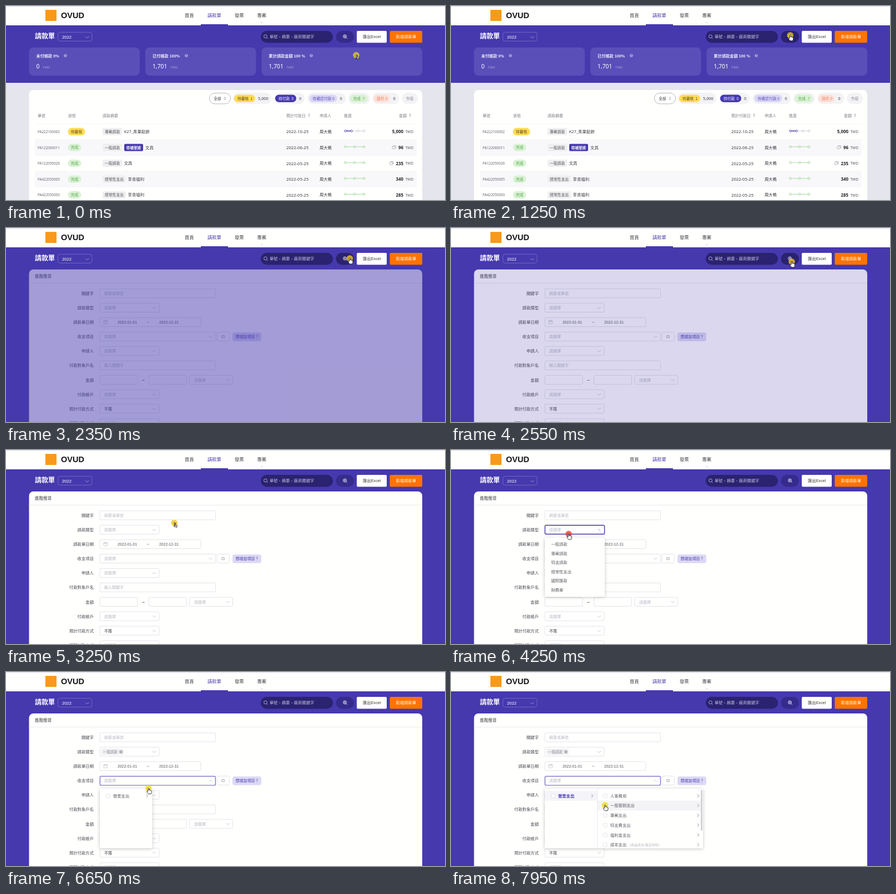
These frames come from a looping animation (791 px wide and 351 px high, 8 s). An HTML page:

```html
<!DOCTYPE html>
<html lang="zh-Hant">
<head>
<meta charset="utf-8">
<title>請款單</title>
<style>
html,body{margin:0;width:100%;height:100%;overflow:hidden;background:#4639ae}
svg{display:block;width:100vw;height:100vh}
text{font-family:"Liberation Sans","Noto Sans CJK TC","Noto Sans CJK",sans-serif;white-space:pre}
.n{font-family:"Noto Sans","Noto Sans CJK TC","Noto Sans CJK",sans-serif}
.b{font-weight:700}
.m{font-weight:500}
.shadow{filter:drop-shadow(0 1px 3px rgba(0,0,0,.22))}
</style>
</head>
<body>
<svg id="stage" viewBox="0 0 791 351" xmlns="http://www.w3.org/2000/svg"></svg>
<script>
const LOOP = 8000;
const MAIN = '#4639ae', DARK = '#2b2270', INK = '#3a3a40', GREY = '#7d7d84', PALE = '#b9bac4', LINE = '#dddee4';

// y is the vertical centre of the line
const text = (x, y, s, size = 7.3, fill = INK, cls = '', anchor = 'start') =>
  `<text x="${x}" y="${y + size * 0.37}" font-size="${size}" fill="${fill}" class="${cls}" text-anchor="${anchor}">${s}</text>`;
const rect = (x, y, w, h, r, fill, more = '') =>
  `<rect x="${x}" y="${y}" width="${w}" height="${h}" rx="${r}" fill="${fill}" ${more}/>`;
const stroke = (d, color, w = 0.8, more = '') =>
  `<path d="${d}" fill="none" stroke="${color}" stroke-width="${w}" ${more}/>`;
const circle = (x, y, r, fill, more = '') => `<circle cx="${x}" cy="${y}" r="${r}" fill="${fill}" ${more}/>`;
const chevron = (x, y, color = PALE, id = '') =>
  `<g transform="translate(${x} ${y})">${stroke('M-3-1.5L0 1.5L3-1.5', color, 0.8, id && `id="${id}"`)}</g>`;
const sorter = (x, y) => `<path d="M${x - 2.2} ${y - 0.8}l2.2-2.2 2.2 2.2zM${x - 2.2} ${y + 0.8}l2.2 2.2 2.2-2.2z" fill="#b4b5bd"/>`;
const group = (id, body, more = '') => `<g id="${id}" ${more}>${body}</g>`;

function header() {
  return rect(0, 0, 791, 35, 0, '#fffffd') + rect(0, 0, 791, 1, 0, '#d9d7ee') +
    rect(71, 7, 20, 20, 0, '#f79a1c') + text(99, 17, 'OVUD', 14.5, '#15151a', 'b') +
    text(322, 16.5, '首頁', 8.3, INK, 'm') + text(363, 16.5, '請款單', 8.3, MAIN, 'm') +
    text(412, 16.5, '發票', 8.3, INK, 'm') + text(452.5, 16.5, '專案', 8.3, INK, 'm') +
    stroke('M459.5 29.5l1.5 1 1.5-1', '#999', 0.6) + rect(351, 33, 49, 2, 0, MAIN);
}

function toolbar() {
  return text(52, 55, '請款單', 12, '#fff', 'b') +
    rect(93.5, 47.5, 61.5, 16, 4, 'none', 'stroke="#7a70c8" stroke-width=".8"') +
    text(101, 55.7, '2022', 7.7, '#fff') + chevron(146.5, 56.5, '#b9b3e4') +
    rect(459, 45, 130, 21.5, 10.7, DARK) + circle(467.5, 55, 2.9, 'none', 'stroke="#c9c5e6" stroke-width=".8"') +
    stroke('M469.7 57.2l2 2', '#c9c5e6') + text(475, 55.7, '單號、摘要、廠商關鍵字', 7.3, '#c4c0de') +
    rect(594.5, 45, 32.5, 21.5, 10.7, '#362b8c', 'id="zoom"') +
    circle(610.5, 55, 2.9, 'none', 'stroke="#fff" stroke-width=".9"') +
    stroke('M612.7 57.2l2 2M609 55h3M610.5 53.5v3', '#fff') +
    rect(632, 45, 54, 21.5, 2, '#fff') + text(659.3, 55.7, '匯出Excel', 7.3, INK, '', 'middle') +
    rect(691.5, 45, 58.5, 21.5, 2, '#ff7300') + text(720.7, 55.7, '新增請款單', 7.3, '#fff', '', 'middle');
}

function stats() {
  const card = (x, w, name, qx, val, tx) =>
    rect(x, 75, w, 51, 8, '#5a4fb8') + text(x + 13, 90.5, name, 7.2, '#efedfb', 'b') +
    circle(qx, 89.7, 2.8, '#a9a3dc') + text(qx, 89.9, '?', 4.6, '#5a4fb8', 'b', 'middle') +
    text(x + 13, 109, val, 10.3, '#fff', 'n m') + text(tx, 110.3, 'TWD', 6.1, '#a9a3dc', 'n');
  return card(41.5, 199.5, '未付帳款 0%', 107, '0', 66) + card(251, 199.5, '已付帳款 100%', 325, '1,701', 296) +
    card(460.5, 289.5, '累計請款金額 100 %', 550, '1,701', 505);
}

function filters() {
  // outer box, inner pill, label, count, sum
  const pill = (x, w, px, pw, bg, ink, name, n, nx, sum, sx) =>
    rect(x, 157, w, 20.5, 10.2, '#f3f3f6') + rect(px, 160.5, pw, 13.5, 6.7, bg) +
    text(px + 6, 167.3, name, 6.8, ink) + text(nx, 167.3, n, 6.6, ink) + (sum ? text(sx, 167.3, sum, 7.3, INK, 'n') : '');
  return rect(366.5, 157.5, 38, 19.5, 9.7, '#fff', 'stroke="#a3a3ab" stroke-width=".8"') +
    text(374.5, 167.3, '全部', 6.6, INK) + sorter(394.5, 167.2) +
    pill(409, 69, 411, 38, '#ffdc55', '#5c4a10', '待審核', 1, 440.5, '5,000', 454) +
    pill(483, 55, 485, 38, MAIN, '#fff', '待付款', 0, 514.5, '0', 528) +
    pill(543, 69.5, 546.5, 50, '#dad7f5', '#5a4fb8', '待確認付款', 0, 588, '0', 601.5) +
    pill(617, 39, 619.5, 32, '#d9f2d3', '#5aa552', '完成', 7, 642.5) +
    pill(660, 48.5, 662, 29, '#fde0d8', '#ef8064', '退件', 0, 683.5, '0', 697.5) +
    rect(713, 157, 29, 20.5, 10.2, '#f3f3f6') + text(727.5, 167.3, '作廢', 6.8, '#8d8d95', '', 'middle');
}

const ROWS = [
  ['PA222100002', '專案請款', 'K27_青果鬆餅', '2022-10-25', '5,000'],
  ['PA122060011', '一般請款', '文具', '2022-06-25', '96'],
  ['PA122050026', '一般請款', '文具', '2022-05-25', '235'],
  ['PA422050005', '經常性支出', '享食福利', '2022-05-25', '340'],
  ['PA422050003', '經常性支出', '享食福利', '2022-05-25', '285']
];

function row([no, kind, memo, date, sum], i) {
  const y = 227.3 + i * 28.6, open = i === 0, kw = kind.length * 6.8 + 8;
  let out = i % 2 ? rect(52, y - 14.3, 688, 28.6, 0, '#f8f8fb') : '';
  out += stroke(`M52 ${y + 14.3}H740`, '#eeeef2', 0.6) + text(57, y + 0.4, no, 6.3, '#66666e', 'n');
  out += open ? rect(111.5, y - 6.7, 31, 13.5, 6.7, '#ffdc55') + text(127, y, '待審核', 6.8, '#5c4a10', '', 'middle')
    : rect(111.5, y - 6.7, 24, 13.5, 6.7, '#d9f2d3') + text(123.5, y, '完成', 6.8, '#5aa552', '', 'middle');
  out += rect(174, y - 6.5, kw, 13, 2, '#efeff1') + text(178, y + 0.2, kind, 6.8, '#55555c');
  let x = 174 + kw + 3.5;
  if (i === 1) {
    out += rect(213, y - 6.5, 34, 13, 2, MAIN) + text(230, y + 0.2, '待補單據', 6.6, '#fff', 'b', 'middle');
    x = 251;
  }
  out += text(x, y, memo, 7.4, INK, 'n') + text(505, y + 0.3, date, 7.7, INK, 'n') + text(565, y, '周大鴨', 7.3, INK);
  const py = y - 1.2, dots = open ? [611.5, 622.5, 634, 645] : [611.5, 628, 645];
  out += stroke(`M611 ${py}H645`, open ? '#cfcfd8' : '#a5dba0', 1);
  if (open) out += stroke(`M611 ${py}H622`, MAIN, 1.4);
  dots.forEach((d, k) => {
    out += circle(d, py, 1.8, '#fff', `stroke="${open ? (k < 2 ? MAIN : '#c4c4d0') : '#8fd08a'}" stroke-width=".9"`);
  });
  out += text(716, y + 0.2, sum, 7.9, '#26262c', 'n b', 'end') + text(719.5, y + 0.5, 'TWD', 6.5, '#55555c', 'n');
  if (i === 1 || i === 2) {
    const ix = i === 1 ? 696 : 691.5;
    out += rect(ix + 1.5, y - 3.2, 5, 4.2, 0.5, '#fff', 'stroke="#9a9aa2" stroke-width=".7"') +
      rect(ix, y - 1.8, 5, 4.2, 0.5, '#fff', 'stroke="#9a9aa2" stroke-width=".7"');
  }
  return out;
}

function list() {
  const head = [[57, '單號'], [112, '狀態'], [174, '請款摘要'], [505, '預計付款日'], [565, '申請人'], [609, '進度'], [708, '金額']];
  return rect(0, 139, 791, 212, 0, '#e5e6ed') + rect(41.5, 152, 708.5, 220, 8, '#fffffe') + filters() +
    head.map(([x, s]) => text(x, 198, s, 7, GREY)).join('') + sorter(546, 197.5) + sorter(728, 197.5) +
    stroke('M52 213H740', '#eeeef2', 0.6) + ROWS.map(row).join('');
}

function form() {
  const labels = ['關鍵字', '請款類型', '請款單日期', '收支項目', '申請人', '付款對象戶名', '金額', '付款帳戶', '預計付款方式', '實際付款方式'];
  const at = i => 118.2 + i * 26.1;
  const box = (i, x, w, hint = '', down = false, ink = PALE, id = '') =>
    rect(x, at(i) - 8.2, w, 16.2, 2, '#fffffe', `stroke="${LINE}" stroke-width=".8"`) +
    (hint ? `<g ${id && `id="${id}Hint"`}>${text(x + 8, at(i) + 0.2, hint, 7, ink)}</g>` : '') +
    (down ? chevron(x + w - 9, at(i) + 0.2, PALE, id && id + 'Arrow') : '');
  const ask = '請選擇', d = at(2);
  return rect(41.5, 75, 708.5, 300, 8, '#fffffe') + text(52, 87.5, '進階搜尋', 7.5, INK) +
    stroke('M41.5 99.7H750', '#e4e4ea') +
    labels.map((s, i) => text(158, at(i), s, 7.35, '#4a4a51', '', 'end')).join('') +
    box(0, 169, 208.5, '摘要或單號') + box(1, 169, 107, ask, true, PALE, 'kind') +
    box(2, 169, 182) + rect(176, d - 3, 6.5, 6, 0.5, 'none', `stroke="${PALE}" stroke-width=".7"`) +
    stroke(`M176 ${d - 1}h6.5M177.8 ${d - 4}v2M180.7 ${d - 4}v2`, PALE, 0.7) +
    text(201, d + 0.2, '2022-01-01', 6.85, '#55555c') + text(254, d, '~', 7.3, INK) + text(276, d + 0.2, '2022-12-31', 6.85, '#55555c') +
    box(3, 169, 208.5, ask, true, PALE, 'item') + box(3, 380, 22.5) +
    stroke('M389 196v-1.4h4.2v1.6M393.6 197v1.5h-4.4v-1.6M388.2 196.2l.9.9.9-.9M392.4 196.3l.9-.9.9.9', '#8d8d95', 0.7) +
    rect(408, 189, 52, 15.7, 4, '#dcd9f4') + text(413.5, 196.8, '想增加項目？', 7, MAIN) +
    box(4, 169, 107, ask, true) + box(5, 169, 208.5, '輸入關鍵字') +
    box(6, 169, 68) + text(247.5, at(6), '~', 8, INK, 'b', 'middle') + box(6, 257.5, 68) + box(6, 331, 77.5, ask, true) +
    box(7, 169, 107, ask, true) + box(8, 169, 107, '不限', true, INK) + box(9, 169, 107, ask, true) +
    rect(169.4, 136.2, 107.2, 16, 2, 'none', `id="kindRing" stroke="${MAIN}" stroke-width="1.4"`) +
    rect(169.4, 188.6, 208, 16.4, 2, 'none', `id="itemRing" stroke="#7269c6" stroke-width="1.2"`) +
    group('tag', rect(172, 139, 40, 10.7, 2, '#efeff2') + text(175, 144.6, '一般請款', 6.4, '#8a8a92') +
      circle(207, 144.5, 2.8, '#a2a2aa') + stroke('M206 143.5l2 2m0-2l-2 2', '#fff', 0.6));
}

function kindMenu() {
  const names = ['一般請款', '專案請款', '特支請款', '經常性支出', '國際匯款', '財務單'];
  return rect(169, 0, 108, 113, 2, '#fffffe', 'class="shadow"') + '<path d="M185 0l4-3.5 4 3.5z" fill="#fffffe"/>' +
    rect(169, 3.5, 108, 17.5, 0, '#f4f4f9', 'id="hover"') +
    names.map((s, i) => group(i ? '' : 'plain', text(180.5, 12 + i * 17.6, s, 7.3, '#5c5c64'))).join('') +
    group('picked', text(180.5, 12, names[0], 7.3, MAIN, 'b') + stroke('M261 12l2 2 3.6-4', MAIN, 0.9));
}

function itemMenu() {
  const names = ['人事費用', '一般管銷支出', '專案支出', '特支費支出', '福利金支出', '成本支出'];
  const check = (x, y) => rect(x, y - 3.3, 6.6, 6.6, 1, '#fffffe', `stroke="${LINE}" stroke-width=".8"`);
  const next = (x, y, c) => stroke(`M${x} ${y - 2.8}l2.6 2.8-2.6 2.8`, c, 0.9);
  const col = names.map((s, i) => {
    const y = 13 + i * 17.7;
    return check(274.5, y) + text(287, y, s, 7.3, '#5c5c64') + next(444, y, '#85858d');
  }).join('');
  return rect(169, 0, 94.5, 108, 2, '#fffffe', 'class="shadow"') +
    group('side', rect(263.5, 0, 190.5, 108, 2, '#fffffe', 'class="shadow"') + rect(255, 0, 15, 108, 0, '#fffffe') +
      rect(264, 21.8, 186, 17.7, 0, '#f4f4f7', 'id="rowHover"') + stroke('M263.5 0V108', '#e6e6ec') + col +
      text(322, 101.8, '(商品成本/進貨材料)', 6, PALE) + rect(450, 2, 3, 74, 1.5, '#d3d3d9')) +
    rect(169, 4.2, 94, 17.6, 0, '#f4f4f9', 'id="firstHover"') + check(181, 13) +
    `<g id="first0">${text(193, 13, '營業支出', 7.3, '#5c5c64')}</g>` +
    `<g id="first1">${text(193, 13, '營業支出', 7.3, MAIN, 'b')}</g>` + next(253, 13, '#85858d');
}

function pointer() {
  return circle(0, 0, 5.8, '#ffe000', 'id="halo"') +
    '<path id="arrow" d="M0-1V7.6L2-.0L2 5.8L3.3 8.6L4.6 8L3.4 5.3H6Z" fill="#fff" stroke="#111" stroke-width=".7"/>' +
    '<path id="hand" d="M-.9 5.4V0Q0-1.4.9 0V3.2Q2-.0 2.6 3.5Q3.7 2.6 4.2 4Q5.4 3.4 5.5 5V7L4.5 10H-.3L-2.9 6.4Q-3.2 4.6-1.6 5Z" fill="#fff" stroke="#111" stroke-width=".8" stroke-linejoin="round"/>';
}

const $ = id => document.getElementById(id);
$('stage').innerHTML = rect(0, 0, 791, 351, 0, MAIN) + group('home', stats() + list()) + group('form', form()) +
  header() + toolbar() + group('kindMenu', kindMenu()) + group('itemMenu', itemMenu()) + group('pointer', pointer());

const PATH = [
  [0, 631, 89], [550, 631, 89], [1300, 611, 52.5], [2100, 611, 52.5], [2300, 620, 55], [2400, 619, 55],
  [2550, 614, 61], [2700, 608, 65], [3500, 212, 152], [4450, 212, 152], [5150, 224, 171], [5550, 224, 171],
  [6150, 302, 197], [6400, 302, 197], [6900, 212, 224], [7250, 212, 224], [7850, 277.5, 241], [8000, 277.5, 241]
];
const FADE = [[2050, 0], [2350, 0.5], [2550, 0.8], [2700, 1]];
const HALO = [
  [0, '#f5dc1e', 0.7], [1900, '#d8261f', 0.85], [2150, '#f59a1a', 0.85], [2330, '#f0c41e', 0.8],
  [4020, '#ee3a33', 0.8], [4300, '#f59a1a', 0.85], [4480, '#f5dc1e', 0.75], [5190, '#ee3a33', 0.8],
  [5330, '#f59a1a', 0.9], [5560, '#f5dc1e', 0.75], [6160, '#ee3a33', 0.8], [6310, '#f59a1a', 0.85], [6450, '#f5dc1e', 0.8]
];

const clamp = v => Math.max(0, Math.min(1, v));
const ramp = (t, a, len) => clamp((t - a) / len);
const smooth = p => p * p * (3 - 2 * p);
const within = (t, a, b) => t >= a && t < b;
const show = (id, on) => $(id).style.display = on ? '' : 'none';

function sample(table, t, ease) {
  if (t <= table[0][0]) return table[0].slice(1);
  const i = table.findIndex(r => r[0] > t);
  if (i < 0) return table[table.length - 1].slice(1);
  const a = table[i - 1], b = table[i], p = ease((t - a[0]) / (b[0] - a[0]));
  return a.slice(1).map((v, k) => v + (b[k + 1] - v) * p);
}

function unfold(id, y, t, open, close) {
  const s = (1 - (1 - ramp(t, open, 300)) ** 3) * (1 - ramp(t, close, 200) ** 2);
  show(id, s > 0.01);
  $(id).setAttribute('transform', `translate(0 ${y}) scale(1 ${s})`);
  $(id).setAttribute('opacity', clamp(s * 1.15));
}

function turn(id, t, open, close) {
  const p = (1 - (1 - ramp(t, open, 300)) ** 1.5) * (1 - smooth(ramp(t, close, 250)));
  $(id).setAttribute('transform', `rotate(${-180 * p})`);
}

function draw(t) {
  const home = 1 - ramp(t, 1880, 150), fade = sample(FADE, t, p => p)[0];
  $('home').setAttribute('opacity', home);
  $('form').setAttribute('opacity', fade);
  show('home', home > 0);
  show('form', fade > 0);
  $('zoom').setAttribute('fill', within(t, 1250, 2700) ? DARK : '#362b8c');

  unfold('kindMenu', 159, t, 4065, 6230);
  turn('kindArrow', t, 4065, 6230);
  show('kindRing', within(t, 4050, 6230));
  const chosen = t >= 5300;
  show('tag', chosen);
  show('kindHint', !chosen);
  show('picked', chosen);
  show('plain', !chosen);
  show('hover', within(t, 4900, 5800));

  unfold('itemMenu', 211, t, 6300, 9000);
  turn('itemArrow', t, 6300, 9000);
  show('itemRing', t >= 6250);
  const side = t >= 6950;
  show('side', side);
  show('first0', !side);
  show('first1', side);
  show('firstHover', t >= 6750);
  show('rowHover', t >= 7650);

  const [x, y] = sample(PATH, t, smooth), arrow = t < 1200 || within(t, 2720, 3400);
  $('pointer').setAttribute('transform', `translate(${x} ${y})`);
  show('arrow', arrow);
  show('hand', !arrow);
  const [, color, alpha] = HALO.filter(h => h[0] <= t).pop();
  $('halo').setAttribute('fill', color);
  $('halo').setAttribute('opacity', alpha);
}

function tick() {
  draw(performance.now() % LOOP);
  requestAnimationFrame(tick);
}
tick();
</script>
</body>
</html>
```
